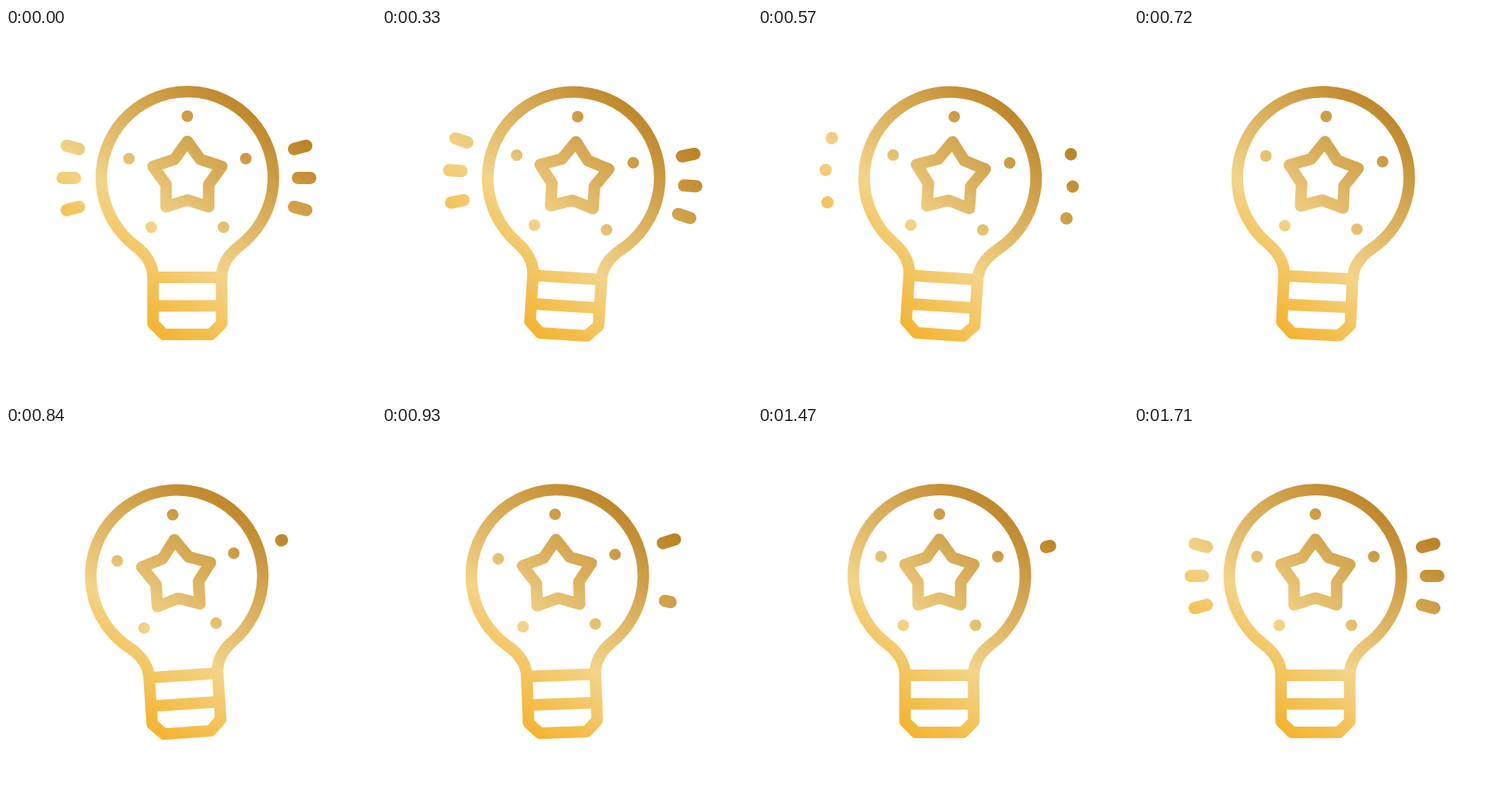
These frames come from a looping animation (512 px wide and 512 px high, 1890 ms). An HTML page:

```html
<!DOCTYPE html>
<html lang="en">
<head>
<meta charset="utf-8">
<title>Bright idea</title>
<style>
  html, body { margin: 0; width: 100%; height: 100%; overflow: hidden; background: #fff; }
  svg { display: block; width: 100vw; height: 100vh; }
</style>
</head>
<body>
<svg viewBox="0 0 512 512">
  <defs>
    <linearGradient id="gold" gradientUnits="userSpaceOnUse" x1="140" y1="365" x2="356" y2="77">
      <stop offset="0" stop-color="#f4b534"/>
      <stop offset=".32" stop-color="#f3d488"/>
      <stop offset=".91" stop-color="#bd8427"/>
      <stop offset="1" stop-color="#b87d1e"/>
    </linearGradient>
  </defs>
  <g id="lamp" fill="none" stroke="url(#gold)" stroke-width="16" stroke-linecap="round" stroke-linejoin="round">
    <path d="M180 302.5A119 119 0 1 1 322 302.5C308 313.5 298.5 328 298.5 345V409L283.5 424H218.5L203.5 409V345C203.5 328 194 313.5 180 302.5Z"/>
    <path d="M203.5 345H298.5M203.5 384.5H298.5"/>
    <path id="star"/>
    <path id="dots"/>
    <g id="rays" stroke-width="17"></g>
  </g>
</svg>
<script>
const LOOP = 1890, STEP = 30;
const CX = 251, CY = 207;
const $ = id => document.getElementById(id);
const clamp = v => Math.max(0, Math.min(1, v));
const ease = p => (1 - Math.cos(Math.PI * p)) / 2;
const progress = (t, from, length) => clamp((t - from) / length);
const polar = (r, deg) => {
  const a = deg * Math.PI / 180;
  return [CX + r * Math.sin(a), CY - r * Math.cos(a)];
};

// Star and dots share a five-fold symmetry
let star = '', dots = '';
for (let i = 0; i < 10; i++) {
  star += (i ? 'L' : 'M') + polar(i % 2 ? 31 : 50, i * 36);
  if (i % 2 === 0) dots += `M${polar(85, i * 36)}h.01`;
}
$('star').setAttribute('d', star + 'Z');
$('dots').setAttribute('d', dots);

// The lamp tips over, swings evenly, then settles
const HALF = 99.5, FIRST = 352, LAST = FIRST + 5 * HALF;

function angle(t) {
  if (t < FIRST) return 4.6 * progress(t, 240, FIRST - 240);
  if (t < LAST) return 0.3 + 4.3 * Math.cos(Math.PI * (t - FIRST) / HALF);
  return -4 * (1 - ease(progress(t, LAST, 170)));
}

// Three mirrored rays per side, lit one after another
const rays = [];
for (const side of [1, -1]) {
  for (const row of [-1, 1, 0]) {
    const el = document.createElementNS('http://www.w3.org/2000/svg', 'path');
    $('rays').append(el);
    const reach = row ? 148.75 : 154.25;
    const k = rays.length;
    const at = p => [249.75 + side * (reach + 17 * p), 207.5 + row * (40 + 4.5 * p)];
    rays.push({ el, at, grow: 835 + 54 * k, fade: 985 + 54 * k, back: 1440 + 32 * k });
  }
}

// Visible part of a ray as [from, to], or null when hidden
function trim(t, { grow, fade, back }) {
  if (t < 590) return [ease(progress(t, 320, 240)), 1];
  if (t < grow) return null;
  if (t < fade) return [0, progress(t, grow, 90)];
  if (t < fade + 65) return [progress(t, fade, 50), 1];
  if (t < back) return null;
  return [0, progress(t, back, 90)];
}

function drawRay(t, ray) {
  const span = trim(t, ray);
  const d = span ? `M${ray.at(span[0])}L${ray.at(span[1] + 0.001)}` : '';
  ray.el.setAttribute('d', d);
}

function draw(t) {
  $('lamp').setAttribute('transform', `rotate(${angle(t)} 251 428)`);
  rays.forEach(ray => drawRay(t, ray));
}

const start = performance.now();
function tick() {
  const t = (performance.now() - start) % LOOP;
  draw(Math.floor(t / STEP) * STEP);
  requestAnimationFrame(tick);
}
draw(0);
requestAnimationFrame(tick);
</script>
</body>
</html>
```
